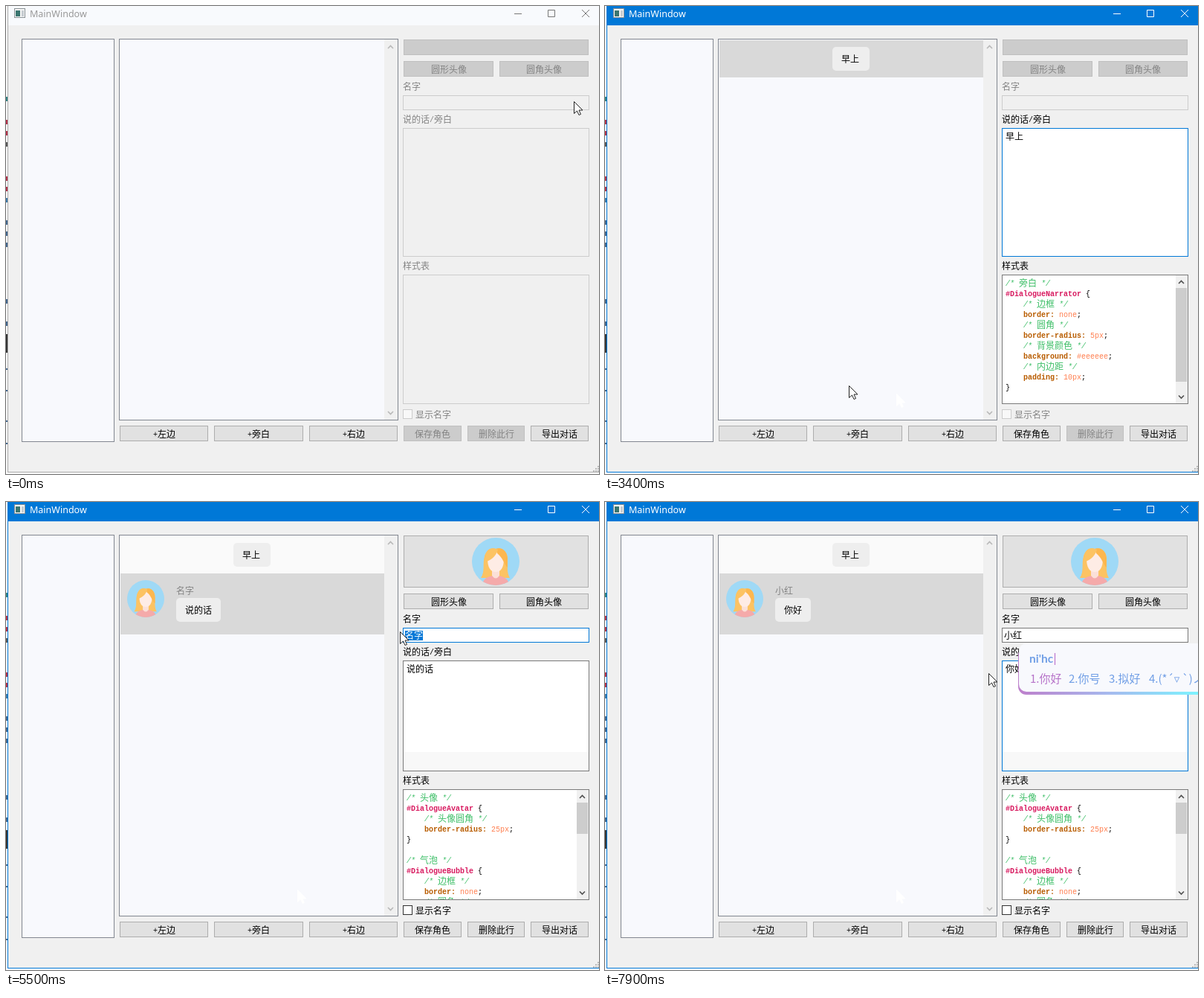
These frames come from a looping animation (798 by 629 pixels, 8000 ms). An HTML page with a canvas:

```html
<!DOCTYPE html>
<html lang="zh">
<meta charset="utf-8">
<title>MainWindow</title>
<style>
  html, body { margin: 0; width: 100%; height: 100%; overflow: hidden; }
  canvas { display: block; }
</style>
<canvas id="stage" width="798" height="629"></canvas>
<script>
const ctx = document.getElementById('stage').getContext('2d');
const LOOP = 8000, STEP = 100, BLUE = '#0078d7', GRAY = '#838383';
const CJK = '"Noto Sans CJK SC", "Noto Sans CJK JP", sans-serif';

// Pointer stops: time, x, y
const path = [
  [0, 764, 128], [700, 365, 577], [900, 365, 577], [1100, 392, 521], [1500, 574, 168],
  [1800, 528, 156], [2000, 508, 163], [2900, 508, 163], [3400, 328, 510], [3700, 226, 566],
  [3900, 226, 566], [4100, 302, 472], [4700, 570, 174], [5000, 570, 174], [5500, 530, 174],
  [6300, 530, 174], [6600, 606, 219], [6700, 606, 219], [7100, 516, 230], [LOOP, 516, 230]
];

const narratorCss = `/* 旁白 */
#DialogueNarrator {
    /* 边框 */
    border: none;
    /* 圆角 */
    border-radius: 5px;
    /* 背景颜色 */
    background: #eeeeee;
    /* 内边距 */
    padding: 10px;
}`.split('\n');

const bubbleCss = `/* 头像 */
#DialogueAvatar {
    /* 头像圆角 */
    border-radius: 25px;
}

/* 气泡 */
#DialogueBubble {
    /* 边框 */
    border: none;
    /* 圆角 */`.split('\n');

function rect(x, y, w, h, color) {
  ctx.fillStyle = color;
  ctx.fillRect(x, y, w, h);
}

function box(x, y, w, h, fill, border) {
  rect(x, y, w, h, border);
  rect(x + 1, y + 1, w - 2, h - 2, fill);
}

function round(x, y, w, h, r, fill) {
  ctx.fillStyle = fill;
  ctx.beginPath();
  ctx.roundRect(x, y, w, h, r);
  ctx.fill();
}

function lines(color, ...polylines) {
  ctx.strokeStyle = color;
  ctx.beginPath();
  for (const points of polylines)
    points.forEach(([x, y], i) => i ? ctx.lineTo(x, y) : ctx.moveTo(x, y));
  ctx.stroke();
}

function plain(s, x, y, font, color) {
  ctx.font = font;
  ctx.fillStyle = color;
  ctx.fillText(s, x, y);
}

const textWidth = s => [...s].reduce((w, c) => w + (c < '\x7f' ? 6 : 12), 0);

// Half-width Latin and full-width Chinese on a 6 px grid, centred on y
function text(s, x, y, color = '#000', style = '') {
  for (const run of s.match(/[\x20-\x7e]+|[^\x20-\x7e]+/g) || []) {
    const latin = run[0] < '\x7f';
    plain(run, x, y + (latin ? 4 : 5),
      latin ? style + ' 10px "Liberation Mono", monospace' : '12px ' + CJK, color);
    x += textWidth(run);
  }
  return x;
}

function button(label, x, y, w, h, enabled = true, fill = '#e1e1e1', border = '#adadad') {
  box(x, y, w, h, enabled ? fill : '#ccc', enabled ? border : '#bfbfbf');
  text(label, Math.round(x + (w - textWidth(label)) / 2), y + 11, enabled ? '#000' : GRAY);
}

function input(x, y, w, h, enabled, focused) {
  box(x, y, w, h, enabled ? '#fff' : '#f0f0f0', !enabled ? '#ccc' : focused ? BLUE : '#7a7a7a');
}

function editable(s, x, y, from, caret) {
  text(s, x, y);
  if (from < s.length) {
    const left = x + from * 12;
    rect(left, y - 6, (s.length - from) * 12, 13, BLUE);
    text(s.slice(from), left, y, '#fff');
  }
  if (caret !== null) rect(x + caret * 12, y - 6, 1, 12, '#000');
}

function chevron(x, y, dir, color) {
  ctx.lineWidth = 1.6;
  lines(color, [[x - 3.5, y + 2 * dir], [x, y - 1.5 * dir], [x + 3.5, y + 2 * dir]]);
  ctx.lineWidth = 1;
}

function blob(color, d) {
  ctx.fillStyle = color;
  ctx.fill(new Path2D(d));
}

function avatar(x, y, r) {
  ctx.save();
  ctx.translate(x, y);
  ctx.scale(r / 32, r / 32);
  ctx.beginPath();
  ctx.arc(0, 0, 32, 0, 7);
  ctx.clip();
  rect(-32, -32, 64, 64, '#9fd9f6');
  blob('#fcc363', 'M-20 22C-14 14-18 2-15-7C-12-18-4-19 0-17C9-20 16-13 16-3C16 8 15 15 19 22Z');
  blob('#f5aaaa', 'M-18 33C-18 22-9 19 0 19S18 22 18 33Z');
  blob('#fbe0d8', 'M-5 8H5V19Q0 26-5 19Z');
  blob('#feece5', 'M-11-4C-11 8-7 14 0 14S11 8 11-4L2-13Z');
  blob('#fdb74f', 'M0-17C9-20 16-13 16-3V8C11 4 10-5 2-11Z');
  blob('#fcc363', 'M3-16C0-7-5-3-12 0L-15 8V-7C-11-19-4-19 3-16Z');
  ctx.restore();
}

function pointer(x, y, fill, stroke) {
  ctx.save();
  ctx.translate(x + .5, y + .5);
  const arrow = new Path2D('M0 0V16L4 12.5L6.5 18L9 17L6.5 11.5H11.5Z');
  ctx.fillStyle = fill;
  ctx.fill(arrow);
  ctx.strokeStyle = stroke;
  ctx.stroke(arrow);
  ctx.restore();
}

function pointerAt(t) {
  const i = path.findIndex(p => p[0] > t);
  const [t0, x0, y0] = path[i - 1], [t1, x1, y1] = path[i];
  const k = (t - t0) / (t1 - t0);
  return [Math.round(x0 + (x1 - x0) * k), Math.round(y0 + (y1 - y0) * k)];
}

function codeLine(line, x, y) {
  const body = line.trimStart();
  x += (line.length - body.length) * 6;
  if (body.startsWith('/*')) text(body, x, y, '#3cbe66', 'italic');
  else if (body.startsWith('#')) text('{', text(body.slice(0, -1), x, y, '#d81b60', 'bold'), y);
  else if (body.includes(':')) {
    const [name, value] = body.split(': ');
    x = text(name + ': ', x, y, '#b85c00', 'bold');
    text(';', text(value.slice(0, -1), x, y, '#ff7f50'), y);
  } else text(body, x, y);
}

function codePanel(y, code, thumb) {
  input(534, y, 251, 535 - y, code, false);
  if (!code) return;
  ctx.save();
  ctx.beginPath();
  ctx.rect(535, y + 1, 249, 533 - y);
  ctx.clip();
  code.forEach((line, i) => codeLine(line, 539, y + 11 + i * 14));
  ctx.restore();
  rect(768, y + 1, 16, 533 - y, '#f0f0f0');
  rect(768, y + 18, 15, thumb, '#cdcdcd');
  chevron(775.5, y + 10, 1, '#505050');
  chevron(775.5, 525.5, -1, '#505050');
}

function backdrop() {
  rect(0, 0, 798, 629, '#fdfdfd');
  const marks = [125, 156, 171, 186, 232, 246, 261, 291, 306, 321, 397, 427, 490, 519, 560, 590];
  marks.forEach((y, i) => rect(0, y - 3, 2, i > 11 ? 2 : 6,
    ['#2f8080', '#b03048', '#b03048', '#555', '#b03048', '#b03048', '#3c78a8'][i] || '#40658c'));
  rect(0, 441, 2, 25, '#333');
}

function frame(active) {
  backdrop();
  rect(2, 0, 796, 627, active ? BLUE : '#aaa');
  rect(3, 26, 795, 600, '#f0f0f0');
  rect(3, 0, 795, 26, active ? BLUE : '#f8fafd');
  box(11, 3, 15, 13, '#f5f5f5', '#8a9296');
  rect(13, 6, 6, 8, '#39756f');
  rect(21, 6, 3, 8, '#c5cbd0');
  plain('MainWindow', 32, 15, '12.5px "Noto Sans", sans-serif', active ? '#fff' : '#999');
  const ink = active ? '#fff' : '#777';
  lines(ink, [[684, 10.5], [694, 10.5]],
    [[729.5, 5.5], [738.5, 5.5], [738.5, 14.5], [729.5, 14.5], [729.5, 5.5]],
    [[775, 5], [785, 15]], [[785, 5], [775, 15]]);
  for (let i = 0; i < 3; i++)
    for (let j = 0; j <= i; j++) rect(796 - j * 3, 618 + i * 3, 2, 2, '#bbb');
}

function rowBack(y, h, focused) {
  if (!focused) return rect(154, y, 355, h, '#d9d9d9');
  rect(155, y, 353, h, '#cce8ff');
  ctx.setLineDash([1, 1]);
  ctx.strokeStyle = '#123';
  ctx.strokeRect(155.5, y + .5, 352, h - 1);
  ctx.setLineDash([]);
}

function ime(x, y, typed, words) {
  const edge = ctx.createLinearGradient(x, 0, 798, 0);
  edge.addColorStop(0, '#bd7fcb');
  edge.addColorStop(.5, '#a6b9ee');
  edge.addColorStop(1, '#7df3ff');
  round(x, y + 5, 270, 64, 11, edge);
  round(x + 1, y, 270, 65, 10, '#f8f9fd');
  plain(typed, x + 15, y + 26, 'bold 15.5px Lato, sans-serif', '#719fe6');
  rect(x + 16 + Math.ceil(ctx.measureText(typed).width), y + 13, 1, 16, '#b565c8');
  const starts = [16, 68, 122, 176];
  words.forEach((word, i) => plain(`${i + 1}.${word}`, x + starts[i], y + 53, '15px ' + CJK,
    i ? '#719fe6' : '#b672c9'));
}

function draw(t) {
  const mode = t < 800 ? 0 : t < 3900 ? 1 : 2, dialog = mode === 2;
  const [px, py] = pointerAt(t);
  const focus = t >= 6800 || (t >= 1500 && t < 3900) ? 'text' : t >= 5000 ? 'name' : '';
  const narrator = t < 2700 ? '旁白' : '早上';
  const name = t < 6200 ? '名字' : '小红';
  const speech = t < 7900 ? '说的话' : '你好';
  const picked = (s, x) => Math.max(0, Math.min(s.length, Math.round((px - x) / 12)));

  frame(t >= 700);

  box(21, 44, 125, 542, '#f8f9fd', '#828790');
  box(152, 44, 376, 513, '#f8f9fd', '#828790');
  rect(509, 45, 18, 511, '#f0f0f0');
  chevron(517.5, 55, 1, '#b8b8b8');
  chevron(517.5, 547, -1, '#b8b8b8');

  if (mode) {
    if (dialog) rect(154, 46, 355, 50, '#fafafa');
    else rowBack(46, 50, !focus);
    round(306, 55, 50, 32, 5, '#eee');
    text(narrator, 318, 71);
  }
  if (dialog) {
    rowBack(96, 82, !focus);
    avatar(188, 130, 25);
    text(name, 229, 119, GRAY);
    round(229, 129, 24 + textWidth(speech), 32, 5, '#eee');
    text(speech, 241, 145);
  }

  // Bottom buttons with hover and press
  ['+左边', '+旁白', '+右边'].forEach((label, i) => {
    const x = [153, 280, 408][i], start = [3600, 600][i];
    const pressed = t === start + 100 || (i === 0 && t === 3800);
    const hover = t >= start && t < start + [700, 500][i];
    const fill = pressed ? '#cce4f7' : !hover ? '#e1e1e1' : i === 0 && dialog ? '#dae7f3' : '#e5f1fb';
    button(label, x, 564, i === 1 ? 120 : 119, 21, true, fill,
      pressed ? '#005499' : hover ? BLUE : '#adadad');
  });
  button('保存角色', 535, 564, 78, 21, mode > 0);
  button('删除此行', 621, 564, 77, 21, dialog);
  button('导出对话', 706, 564, 78, 21);

  // Property panel
  const dy = dialog ? 49 : 0, textY = 164 + dy, codeY = dialog ? 386 : 361;
  const ink = on => on ? '#000' : GRAY;
  button('', 535, 45, 249, dialog ? 70 : 21, dialog);
  if (dialog) avatar(659, 80, 32);
  button('圆形头像', 535, 74 + dy, 121, 21, dialog);
  button('圆角头像', 664, 74 + dy, 120, 21, dialog);
  text('名字', 534, 108 + dy, ink(dialog));
  input(534, 120 + dy, 251, 20, dialog, focus === 'name');
  text('说的话/旁白', 534, 152 + dy, ink(mode));
  input(534, textY, 251, codeY - 24 - textY, mode > 0, focus === 'text');
  if (dialog) rect(535, 336, 249, 25, '#f8f8f8');
  text('样式表', 534, codeY - 12, ink(mode));
  codePanel(codeY, [null, narratorCss, bubbleCss][mode], dialog ? 42 : 126);
  box(534, 542, 13, 13, dialog ? '#fff' : '#f8f8f8', dialog ? '#333' : '#ccc');
  text('显示名字', 551, 549, ink(dialog));

  // Field contents, selection and blinking caret
  if (mode === 1) {
    const selecting = focus && t < 2700;
    const caret = t >= 2700 ? (t < 3200 ? 2 : null) : t >= 2000 && t < 2500 ? 0 : null;
    editable(narrator, 539, 175, selecting ? picked(narrator, 539) : 2, caret);
  } else if (dialog) {
    const naming = t >= 5800 && t < 6200;
    editable(naming ? '' : name, 537, 179,
      t >= 5000 && t < 5800 ? picked(name, 537) : 2,
      naming ? 0 : t >= 6200 && t < 6600 ? 2 : null);
    const composing = t >= 7600 && t < 7900;
    editable(composing ? '' : speech, 539, 224,
      t >= 6800 && t < 7600 ? picked(speech, 539) : 3,
      t >= 7100 && t < 7300 ? 0 : null);
  }

  if (t >= 5800 && t < 6200)
    ime(554, 185, ['x', 'xia', "xiao'h"][Math.min(2, (t - 5800) / STEP)], ['小红', '小黄', '小花', '小孩']);
  if (t >= 7600)
    ime(556, 190, ['n', 'ni', "ni'h", "ni'hc"][(t - 7600) / STEP], ['你好', '你号', '拟好', '(*´▿ `)ノ']);

  if (t >= 1200) pointer(392, 521, '#fff', '#fff');
  pointer(px, py, '#fff', '#222');
}

function tick() {
  draw(Math.floor(performance.now() % LOOP / STEP) * STEP);
  requestAnimationFrame(tick);
}
tick();
</script>
</html>
```
